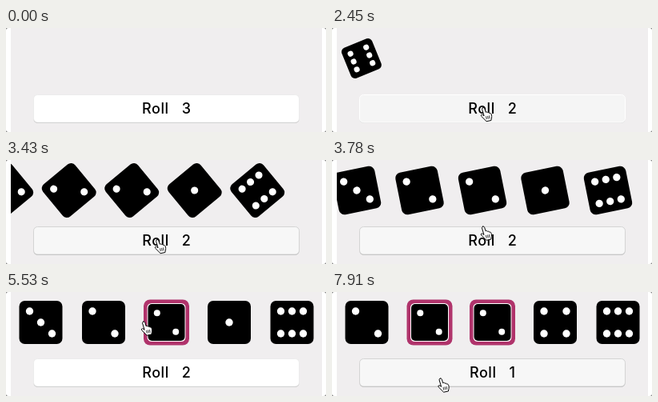
Write an HTML page that moves like this. It is 400x130 px and loops after 8000 ms.

```html
<!DOCTYPE html>
<html lang="en">
<head>
<meta charset="utf-8">
<title>Dice roll</title>
<style>
  html, body { margin: 0; width: 100%; height: 100%; overflow: hidden; background: #fff; }
  svg { display: block; width: 400px; height: 130px; }
  text { font: 500 18px Inter, sans-serif; letter-spacing: .55px; text-anchor: middle; }
  #button { fill: #fff; stroke: #ececec; }
  #shade { fill: #bebebe; }
  .hover #button { fill: #f7f7f7; stroke: #d4d4d4; }
  .press #button { fill: #f5f5f5; stroke: #fff; }
  .press #shade { fill: #d8d8d8; }
</style>
</head>
<body>
<svg viewBox="0 0 400 130">
  <defs><clipPath id="pane"><path d="M6 0H395V130H6z"/></clipPath></defs>
  <path fill="#777" d="M0 0H400V130H0z"/>
  <rect width="400" height="130" rx="3" fill="#fff"/>
  <path fill="#f0eeef" d="M6 0H395V130H6z"/>
  <g id="dice" clip-path="url(#pane)"></g>
  <g id="control">
    <rect id="shade" x="34.5" y="85" width="332" height="34" rx="5"/>
    <rect id="button" x="34.5" y="83.5" width="332" height="34.5" rx="5"/>
    <text id="label" x="200.8" y="107.3"></text>
  </g>
  <g id="hand" stroke="#000" stroke-linejoin="round" stroke-linecap="round">
    <path fill="#fff" d="M3.5 1.2c1-.6 2 0 2.3 1l1.4 4.6c.8-.7 2-.5 2.4.5 .8-.5 1.9-.2 2.2.8 .9-.4 2 .1 2.3 1.1 .6 2 .8 3.5.2 5.5l-.4 2.3-5.8 1.2-6.4-6.4c-1-1.4.5-2.8 1.9-1.6l1.5 1.2L2.6 3c-.2-.8.2-1.4.9-1.8z"/>
    <path fill="none" stroke-width=".8" d="M7.6 12.2l.6 3M9.6 11.8l.6 3M11.6 11.4l.5 3"/>
  </g>
</svg>
<script>
const LOOP = 8000;
const FIRST_ROLL = 2240, SECOND_ROLL = 7280;
const KEEP_THIRD = 5110, KEEP_SECOND = 6160;
const ROLL_END = 4464, TRAVEL = 395;

// Cursor moves: start, duration, x, y
const MOVES = [
  [140, 700, 188, 92], [1190, 770, 185, 98.5], [3640, 420, 184.5, 36],
  [5040, 70, 168, 36], [5530, 270, 106, 36], [5800, 220, 129, 36],
  [6370, 350, 131.5, 107]
];

const $ = id => document.getElementById(id);
const clamp = p => Math.min(1, Math.max(0, p));
const ease = p => p * p * (3 - 2 * p);
const within = (t, from, to) => t >= from && t < to;

const square = (half, r, fill) =>
  `<rect x="${-half}" y="${-half}" width="${2 * half}" height="${2 * half}" rx="${r}" fill="${fill}"/>`;

function hasPip(face, x, y) {
  if (!x && !y) return face % 2 === 1;
  if (x === y) return face > 1;
  if (x === -y) return face > 3;
  return !x && face === 6;
}

function dieMarkup(face, kept) {
  const gap = kept ? 11.7 : 14, r = kept ? 4 : 4.7;
  let out = kept
    ? square(28.5, 8, '#b0336b') + square(24, 5.5, '#fff') + square(23, 5, '#000')
    : square(27, 7, '#000');
  for (let x = -1; x <= 1; x++) {
    for (let y = -1; y <= 1; y++) {
      if (hasPip(face, x, y)) out += `<circle cx="${x * gap}" cy="${y * gap}" r="${r}" fill="#fff"/>`;
    }
  }
  return out;
}

function drawDice(t) {
  // Cubic ease-out; spin and size follow the distance left to travel
  const left = clamp((0.0034 * Math.max(0, ROLL_END - t)) ** 3 / TRAVEL);
  const faces = t < SECOND_ROLL ? [3, 2, 2, 1, 6] : [2, 2, 2, 4, 6];
  $('dice').innerHTML = left === 1 ? '' : faces.map((face, i) => {
    const kept = i === 2 && t >= KEEP_THIRD || i === 1 && t >= KEEP_SECOND;
    const x = 43.5 + 78.5 * i - TRAVEL * left;
    return `<g transform="translate(${x} 38) rotate(${-360 * left}) scale(${1 - 0.3 * left})">`
      + dieMarkup(face, kept) + '</g>';
  }).join('');
}

function cursorAt(t) {
  return MOVES.reduce(([x, y], [start, span, toX, toY]) => {
    const p = ease(clamp((t - start) / span));
    return [x + (toX - x) * p, y + (toY - y) * p];
  }, [215, 134]);
}

function buttonState(t) {
  if (within(t, 2030, 2600) || within(t, SECOND_ROLL, 7420)) return 'press';
  return within(t, 350, 3850) || t >= 7420 ? 'hover' : '';
}

function draw(t) {
  drawDice(t);
  const rolls = 3 - (t >= FIRST_ROLL) - (t >= SECOND_ROLL);
  $('label').textContent = `Roll\u00a0\u00a0\u00a0${rolls}`;
  $('control').setAttribute('class', buttonState(t));
  $('hand').setAttribute('transform', `translate(${cursorAt(t)})`);
}

const start = performance.now();
function tick() {
  draw((performance.now() - start) % LOOP);
  requestAnimationFrame(tick);
}
tick();
</script>
</body>
</html>
```
